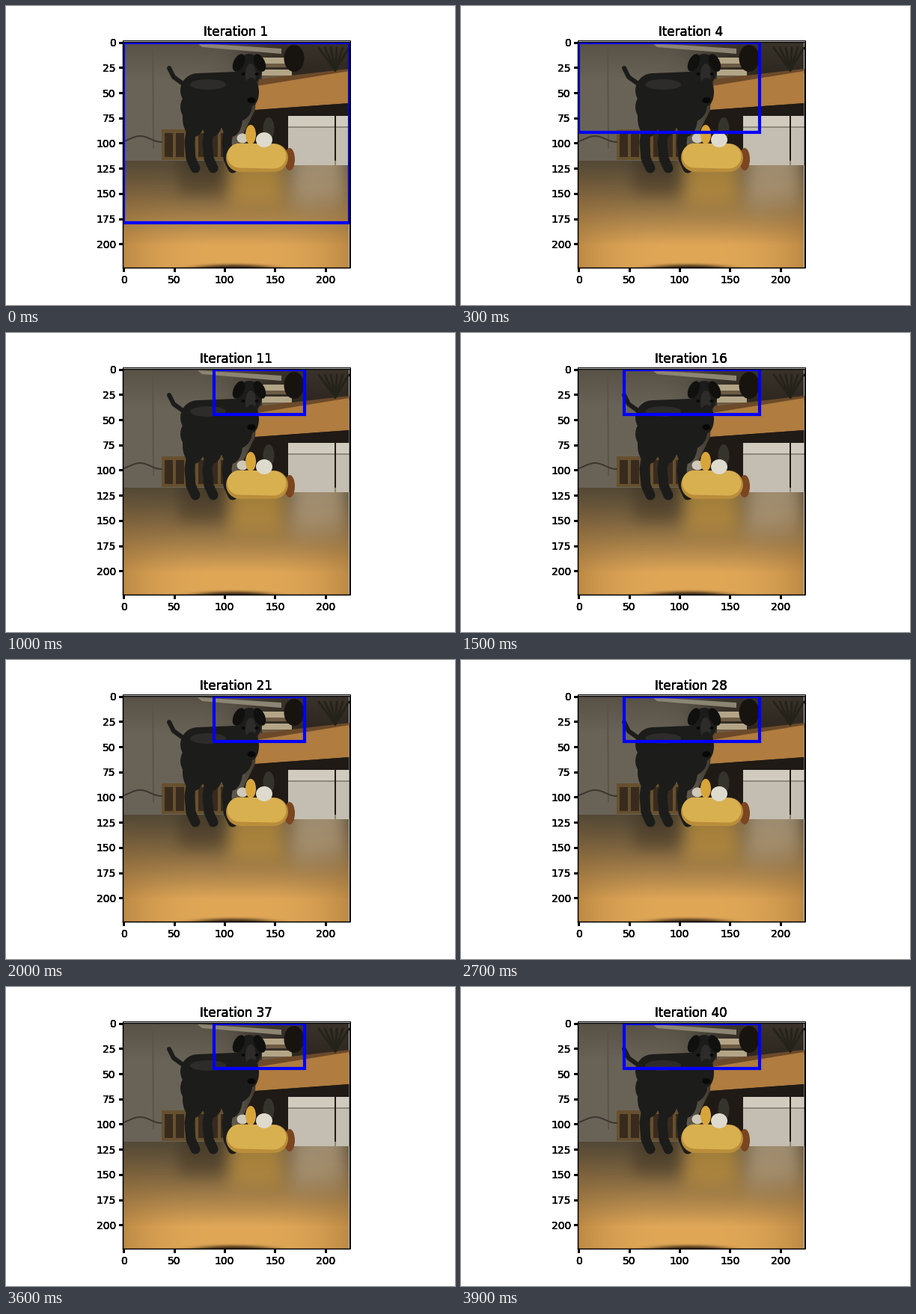
These frames come from a looping animation (600 px wide and 400 px high, 4 s). A matplotlib script:

```python
import matplotlib.pyplot as plt
import numpy as np
from matplotlib.animation import FuncAnimation
from matplotlib.patches import Ellipse, Polygon, Rectangle

W, H, DPI = 600, 400, 100
PX = 72 / DPI
LEFT, TOP, SIDE = 156.5, 48, 302
RIGHT, BOTTOM = LEFT + SIDE, TOP + SIDE
SIZE = 224
STEP = SIZE / 5
# One letter per frame: capitals shrink the window from that side, "l" undoes "L".
MOVES = "BBRBBL" + "Ll" * 17

fig = plt.figure(figsize=(W / DPI, H / DPI), dpi=DPI, facecolor="white")
BOX = [LEFT / W, 1 - BOTTOM / H, SIDE / W, SIDE / H]

# The scene is laid out in stage pixels.
scene = fig.add_axes(BOX)
scene.axis("off")


def poly(color, *pts):
    scene.add_patch(Polygon(pts, fc=color, lw=0))


def rect(color, x0, y0, x1, y1):
    poly(color, (x0, y0), (x1, y0), (x1, y1), (x0, y1))


def oval(color, x, y, w, h, angle=0):
    scene.add_patch(Ellipse((x, y), w, h, angle=angle, fc=color, lw=0, zorder=2))


def limb(color, width, *pts):
    scene.plot(*zip(*pts), color=color, lw=width * PX, solid_capstyle="round",
               solid_joinstyle="round", zorder=2)


def bump(v, center, spread):
    return np.exp(-((v - center) / spread) ** 4)


def mix(a, b, weight):
    a, b = np.array(a, float), np.array(b, float)
    return a + weight[..., None] * (b - a)


def backdrop():
    """Dim wall above a glossy floor that brightens towards the viewer."""
    x, y = np.meshgrid(np.linspace(LEFT, RIGHT, SIDE), np.linspace(TOP, BOTTOM, SIDE))
    wall = mix((106, 100, 88), (44, 37, 30), 1 / (1 + np.exp((325 - x) / 14)))
    wall = mix(wall, (70, 64, 54), 0.6 * np.clip((100 - y) / 60, 0, 1))

    t = np.clip((y - 206) / 115, 0, 1)
    floor = mix((84, 73, 54), (224, 167, 87), t ** 1.3)
    floor = mix(floor, (200, 152, 62), 0.65 * bump(x, 336, 42) * bump(y, 222, 50))
    floor = mix(floor, (182, 162, 130), 0.75 * bump(x, 418, 40) * bump(y, 215, 60))
    floor = mix(floor, (52, 42, 28), 0.4 * bump(x, 262, 34) * bump(y, 215, 40))
    floor = mix(floor, (120, 82, 38), 0.35 * np.abs((x - 308) / 152) ** 3 * t)
    floor = mix(floor, (50, 34, 16), 0.9 * bump(np.hypot((x - 305) / 8, y - 353), 0, 7))
    return np.where((y < 207)[..., None], wall, floor) / 255


def draw_room():
    limb("#59534a", 2, (196, 48), (197, 190))
    poly("#8d8573", (256, 50), (368, 57), (368, 64), (262, 55))
    x = np.linspace(158, 208, 30)
    limb("#3b362f", 2, *zip(x, 178 - 4 * np.sin((x - 165) / 9)))
    rect("#66502f", 208, 165, 300, 206)
    for x in range(212, 300, 15):
        rect("#382b1e", x, 170, x + 11, 202)

    oval("#17130f", 385, 70, 27, 36)
    for tip in range(418, 462, 8):
        limb("#24231a", 3, (tip, 56), (440, 86))
    for y in (74, 90):
        rect("#b3a587", 342, y - 5, 382, y + 3)
        rect("#6d5b45", 342, y + 3, 382, y + 8)

    poly("#6c4a29", (338, 98), (RIGHT, 84), (RIGHT, 90), (336, 110))
    poly("#b07c3f", (335, 107), (RIGHT, 87), (RIGHT, 130), (333, 139))
    poly("#1f1a15", (333, 139), (RIGHT, 130), (RIGHT, 206), (300, 206))
    for x0, x1 in ((377, 439), (441, RIGHT)):
        rect("#c3beb1", x0, 147, x1, 213)
        rect("#d0cbbe", x0, 147, x1, 161)
        rect("#8f887a", x0, 161, x1, 163)


def draw_dog():
    fur, sheen = "#1c1c1a", "#2d2c2a"
    limb(fur, 6, (218, 83), (224, 95), (242, 108))
    for y in (111, 133):
        limb(fur, 46, (256, y + 2), (306, y))
    for x in (248, 272, 298):
        oval(fur, x + 3, 150, 30, 50)
        limb(fur, 13, (x + 2, 150), (x - 3, 182), (x - 1, 204), (x + 5, 217))
    oval(sheen, 270, 105, 48, 14)
    oval(fur, 325, 85, 34, 42)
    oval(sheen, 327, 92, 14, 30)
    oval(fur, 328, 115, 20, 38)
    for side in (-1, 1):
        oval("#10100f", 325 + 14 * side, 76, 14, 25, -25 * side)
        oval("#0a0909", 326 + 9 * side, 91, 5, 4)
    oval("#080808", 328, 126, 11, 8)


def draw_toy():
    oval("#35342c", 351, 164, 15, 30)
    oval("#7b4520", 379, 205, 14, 30)
    oval("#cfc9bb", 316, 177, 15, 13)
    oval("#d9a53a", 327, 172, 14, 26)
    limb("#b98d3a", 38, (313, 203), (358, 203))
    limb("#d9b04f", 33, (312, 200), (358, 201))
    oval("#dedace", 345, 179, 22, 20)


scene.imshow(backdrop(), extent=(LEFT, RIGHT, BOTTOM, TOP), aspect="auto")
draw_room()
draw_dog()
draw_toy()
scene.set_xlim(LEFT, RIGHT)
scene.set_ylim(BOTTOM, TOP)


def add_plot(k):
    ax = fig.add_axes(BOX, label=f"plot{k}")
    ax.patch.set_visible(False)
    ax.set_xlim(-0.5, SIZE - 0.5)
    ax.set_ylim(SIZE - 0.5, -0.5)
    ax.set_xticks(range(0, SIZE, 50))
    ax.set_yticks(range(0, SIZE, 25))
    ax.tick_params(width=3 * PX)
    return ax


# Stacked copies give the lettering its heavy edges.
plots = [add_plot(k) for k in range(5)]
titles = [ax.set_title("Iteration 1") for ax in plots]
window = plots[0].add_patch(Rectangle((0, 0), SIZE, SIZE, fill=False, ec="blue", lw=3))
# Second border pixel, just outside the axes.
fig.add_artist(Rectangle((LEFT, H - BOTTOM - 0.5), SIDE + 2, SIDE + 2, fill=False,
                         lw=PX, snap=False, transform=None))


def draw(i):
    done = MOVES[:i + 1]
    left = done.count("L") - done.count("l")
    right = 5 - done.count("R")
    bottom = 5 - done.count("B")
    window.set_bounds(left * STEP, 0, (right - left) * STEP, bottom * STEP)
    for title in titles:
        title.set_text(f"Iteration {i + 1}")
    return [window, *titles]


anim = FuncAnimation(fig, draw, frames=len(MOVES), interval=100, repeat=True,
                     repeat_delay=0, blit=False)
plt.show()
```
